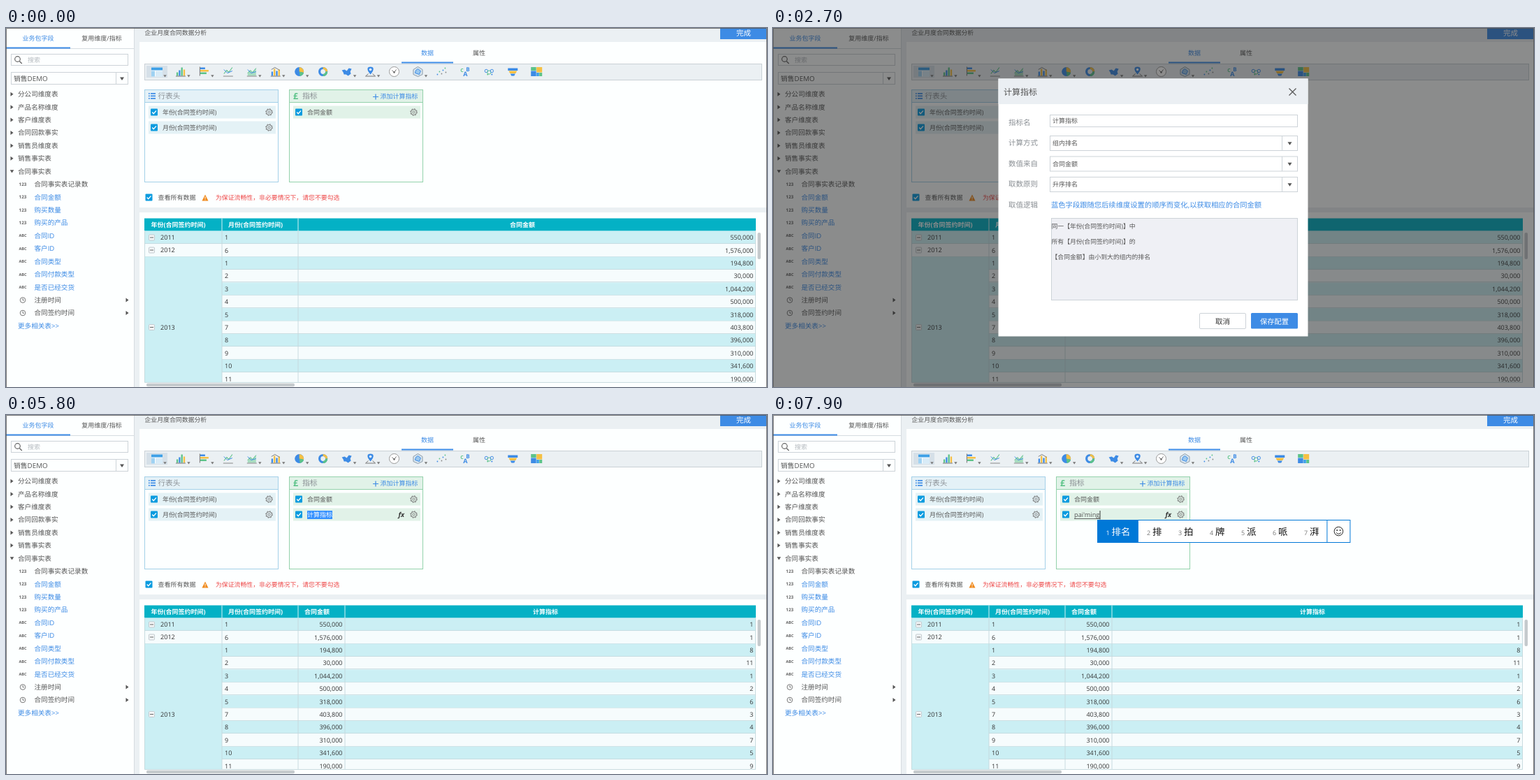
Recreate the animation shown at these times as an HTML page. Size 1089 px wide and 514 px high, loop 8 s.

```html
<!DOCTYPE html>
<html lang="zh-CN">
<head>
<meta charset="utf-8">
<style>
html, body { margin: 0; width: 100%; height: 100%; overflow: hidden; background: #ebf0f3; }
svg { display: block; width: 1089px; height: 514px; }
text { font-family: "Open Sans", "Noto Sans CJK SC", "Noto Sans CJK", sans-serif; white-space: pre; text-rendering: geometricPrecision; }
</style>
</head>
<body>
<svg id="stage" viewBox="0 0 1089 514"></svg>
<script>
const LOOP = 8000, BLUE = '#3d8be5', INK = '#555', DARK = '#333', GREY = '#8a8f94', LINE = '#cdd3d8';
const GREEN = '#5cc389', YELLOW = '#f5c044', IME = '#0078d7', WHITE = '#fdffff';

// Drawing helpers; text y is the vertical centre of the line.
const rect = (x, y, w, h, fill, stroke = 'none', extra = '') =>
  `<rect x="${x}" y="${y}" width="${w}" height="${h}" fill="${fill}" stroke="${stroke}" ${extra}/>`;
const path = (d, stroke, width = 1, fill = 'none') =>
  `<path d="${d}" stroke="${stroke}" stroke-width="${width}" fill="${fill}"/>`;
const shape = (d, fill) => path(d, 'none', 0, fill);
const dot = (x, y, r, fill, stroke = 'none', width = 1) =>
  `<circle cx="${x}" cy="${y}" r="${r}" fill="${fill}" stroke="${stroke}" stroke-width="${width}"/>`;
const text = (x, y, s, size = 9, fill = INK, extra = '') =>
  `<text x="${x}" y="${y + size * 0.36}" font-size="${size}" fill="${fill}" ${extra}>${s.replace(/</g, '&lt;').replace(/>/g, '&gt;')}</text>`;
const MID = 'text-anchor="middle"', END = 'text-anchor="end"', BOLD = 'font-weight="700"';
const at = (x, y, s) => `<g transform="translate(${x} ${y})">${s}</g>`;
const down = (x, y, r = 3, fill = INK) => shape(`M${x - r} ${y - r * 0.7}h${2 * r}l${-r} ${r * 1.5}z`, fill);
const right = (x, y) => shape(`M${x - 2} ${y - 3}v6l4 -3z`, INK);
const check = (x, y) => rect(x - 5, y - 5, 10, 10, '#0a9bdf', 'none', 'rx="1"') +
  path(`M${x - 2.8} ${y}l2 2.2l3.8 -4.4`, '#fff', 1.3);
const gear = (x, y) => dot(x, y, 4, 'none', '#777') + dot(x, y, 1.6, 'none', '#777', 0.9) +
  `<circle cx="${x}" cy="${y}" r="4.8" fill="none" stroke="#777" stroke-width="1" stroke-dasharray="1.8 1.97"/>`;
const bars = (hs, colors) => hs.map((h, i) => rect(-6 + i * 3.3, 6 - h, 2.3, h, colors[i % colors.length])).join('');

function sidebar() {
  let s = rect(0, 0, 183, 514, WHITE) + path('M183.5 0V514', '#d6dce0') +
    text(46, 14.5, '业务包字段', 9, BLUE, MID) + text(137, 14.5, '复用维度/指标', 9, INK, MID) +
    path('M0 29.5H183', '#d6dce0') + rect(0, 27.5, 92, 2, BLUE) +
    rect(7.5, 37.5, 167, 16, WHITE, LINE) + dot(16.5, 44.5, 3.8, 'none', '#666', 1.2) +
    path('M19.3 47.5l3.5 3.5', '#666', 1.3) + text(31, 45.5, '搜索', 9, '#b5babf') +
    rect(7.5, 63.5, 167, 17, WHITE, LINE) + path('M157.5 63V81', LINE) + text(11, 72, '销售DEMO', 9.8) + down(166, 72.5);
  const rowY = i => 94.7 + i * 18.43;
  ['分公司维度表', '产品名称维度', '客户维度表', '合同回款事实', '销售员维度表', '销售事实表', '合同事实表'].forEach((n, i) => {
    s += (i < 6 ? right(8.5, rowY(i)) : down(8.5, rowY(i), 2.8)) + text(17, rowY(i), n, 9.6);
  });
  ['合同事实表记录数', '合同金额', '购买数量', '购买的产品', '合同ID', '客户ID', '合同类型', '合同付款类型', '是否已经交货', '注册时间', '合同签约时间'].forEach((n, i) => {
    const y = rowY(i + 7), date = i > 8;
    s += date ? dot(24, y, 3.8, 'none', '#777') + path(`M24 ${y - 2.4}v2.6h2`, '#777') + right(173.5, y)
      : text(24, y, i < 4 ? '123' : 'ABC', i < 4 ? 6.3 : 5.6, '#666', MID + ' ' + BOLD);
    s += text(40.5, y, n, 9.6, i && !date ? BLUE : INK);
  });
  return s + text(17, rowY(18), '更多相关表>>', 9.6, BLUE);
}

function icons() {
  const list = [
    rect(-8, -6, 16, 13, '#fff') + rect(-8, -6, 16, 4, '#3ea0e6') + rect(-8, -1, 5, 8, '#9fd2f2') + rect(-2, -1, 10, 8, '#d8ebf7'),
    bars([5, 8, 12, 9], [GREEN, BLUE, GREEN, YELLOW]) + path('M-7 6.5H7', '#777'),
    rect(-6, -6, 7, 2.5, BLUE) + rect(-6, -2.5, 12, 2.5, YELLOW) + rect(-6, 1, 9, 2.5, GREEN) + path('M-6.5 -7V6', '#777'),
    path('M-6 3L-2 -2L1 1L6 -6', GREEN, 1.1) + path('M-6 -3L-1 2L6 -1', BLUE) + path('M-7 6.5H7', '#888'),
    shape('M-6 6V2L-2 -2L1 1L6 -5V6z', '#a8dcc0') + path('M-6 2L-2 -2L1 1L6 -5', GREEN) + path('M-6 -3L-1 2L6 0', BLUE) + path('M-7 6.5H7', '#888'),
    bars([6, 10, 7, 9], [BLUE, YELLOW]) + path('M-6 -3L-1 -6L6 -2', '#777', 0.9) + path('M-7 6.5H7', '#777'),
    dot(0, 0, 6.5, BLUE) + shape('M0 0V-6.5A6.5 6.5 0 0 1 6.3 1.5z', YELLOW) + shape('M0 0L6.3 1.5A6.5 6.5 0 0 1 1 6.4z', GREEN),
    dot(0, 0, 5, 'none', BLUE, 3.2) + path('M0 -5A5 5 0 0 1 5 0', YELLOW, 3.2) + path('M5 0A5 5 0 0 1 0 5', GREEN, 3.2),
    shape('M-7 -2L-3 -3L0 -1L3 -5L7 -4L5 0L6 3L2 6L-1 4L-4 4L-5 1z', BLUE),
    shape('M0 4C-7 -4 -4 -7 0 -7S7 -4 0 4z', BLUE) + dot(0, -3, 1.7, '#fff') + path('M-3 3L-7 6.5H7L3 3', '#777'),
    dot(0, 0, 7, '#fff', '#999') + path('M0 1L-3 -2M0 1L3 -3', '#666') + dot(0, 1, 1.2, '#666'),
    path('M0 -7L6.5 -3V4L0 7L-6.5 4V-3z', '#8a9aa8', 1, '#dce8f0') + path('M0 -4L4 -1L2 4L-4 2L-3 -2z', BLUE, 1, '#9cc8ee'),
    [[-6, 4], [-3, 0], [0, 3], [2, -2], [5, -5], [6, 1]].map(([x, y], i) => dot(x, y, 0.9, [BLUE, GREEN, '#888'][i % 3])).join(''),
    text(-7, -2, 'C', 7, GREEN, BOLD) + text(1, -3, 'B', 8, BLUE, BOLD) + text(-3, 3, 'A', 9, BLUE, BOLD),
    dot(-4, -1, 2.2, 'none', BLUE) + dot(0, 1, 2.6, 'none', GREEN) + dot(4, -1, 2.2, 'none', BLUE) + dot(-2, 4, 1, GREEN) + dot(4, 4, 1, BLUE),
    rect(-7, -5, 14, 3.5, BLUE) + shape('M-6 -1H6L4 2.5H-4z', YELLOW) + shape('M-3.5 3H3.5L2 6H-2z', BLUE),
    rect(-8, -6.5, 7.5, 5, GREEN) + rect(-8, -1, 7.5, 7.5, BLUE) + rect(0, -6.5, 8, 7.5, YELLOW) + rect(0, 1.5, 3.6, 5, '#3ea0e6') + rect(4, 1.5, 4, 5, GREEN)
  ];
  const menu = [0, 1, 2, 4, 5, 6, 8, 9, 11];
  return list.map((g, i) => at(216 + i * 33.95, 62.5, g + (menu.includes(i) ? down(11.5, 6.3, 2.2, '#777') : ''))).join('');
}

function chip(x, y, name, fill) {
  return rect(x, y - 9, 182, 18, fill) + check(x + 8, y) + (name ? text(x + 20, y, name) : '') + gear(x + 172.5, y);
}

function panels(t) {
  let s = rect(191, 20, 898, 237, WHITE) + text(198.5, 7, '企业月度合同数据分析', 8.9) +
    rect(1022, 0, 66, 16, BLUE) + text(1055.5, 7.5, '完成', 10.5, '#fff', MID) +
    text(603, 36, '数据', 9, BLUE, MID) + text(677, 36, '属性', 9, INK, MID) +
    rect(198.5, 51.5, 883, 23, '#ebf0f3', '#cad1d6') + rect(566, 48.5, 74, 2, BLUE) +
    rect(201, 54, 30, 17, '#d6e0e8') + icons();

  const box = (x, head, line) => rect(x + 0.5, 88.5, 191, 132, WHITE, line) + rect(x + 0.5, 88.5, 191, 18, head, line);
  s += box(198, '#e4f1f7', '#a3d0e8') + [0, 1, 2].map(i => rect(204, 93 + i * 3.5, 1.7, 1.7, BLUE) + rect(207, 93 + i * 3.5, 7, 1.7, BLUE)).join('') +
    text(217.5, 97.5, '行表头', 10.6, GREY) +
    chip(204, 120.5, '年份(合同签约时间)', '#e4f2f6') + chip(204, 142.5, '月份(合同签约时间)', '#e4f2f6');
  const link = t >= 900 && t < 4800 ? '#6ba8ee' : BLUE;
  s += box(405, '#e1f2e8', '#93d2ab') + text(411, 97, '£', 12.5, GREEN, BOLD) + text(424, 97.5, '指标', 10.8, GREY) +
    path('M525 98.5h8M529 94.5v8', BLUE, 1.2) + text(535.5, 98, '添加计算指标', 9, link) + chip(411, 120.5, '合同金额', '#e1f2e8');
  if (t >= 4800) {
    s += chip(411, 142.5, t < 5800 ? '计算指标' : '', '#e1f2e8') +
      text(561.5, 142.3, 'fx', 9.5, DARK, BOLD + ' font-style="italic"');
    if (t >= 5800 && t < 6900) s += rect(431, 137, 36, 12, '#3390ff') + text(431, 142.5, '计算指标', 9, '#fff');
  }
  return s + check(204.5, 242.5) + text(217.5, 243, '查看所有数据') +
    shape('M285 238.5L289.5 247.5H280.5z', '#f08a1d') + path('M285 241.5v3M285 245.4v1', '#fff') +
    text(300, 243, '为保证流畅性，非必要情况下，请您不要勾选', 8.9, '#ee4848');
}

function table(t) {
  const months = [1, 6, 1, 2, 3, 4, 5, 7, 8, 9, 10, 11];
  const sums = [550000, 1576000, 194800, 30000, 1044200, 500000, 318000, 403800, 396000, 310000, 341600, 190000];
  const ranks = [1, 1, 8, 11, 1, 2, 6, 3, 4, 7, 5, 9];
  const ranked = t >= 5100, tint = '#cbeff4', edge = '#c5d9dd';
  const year = (y, n) => rect(204.5, y - 4, 8, 8, '#f2f5f6', '#c4cbd0', 'rx="1"') +
    path(`M206 ${y}h5`, '#666') + text(221, y, n, 9.1, DARK);
  let s = rect(191, 264, 898, 250, WHITE) + rect(198, 272.5, 875, 18, '#04b1c5');
  let rows = '';
  months.forEach((m, i) => {
    const y = 300 + i * 18.4, top = y - 9.2;
    rows += rect(i < 2 ? 198 : 309, top, i < 2 ? 875 : 764, 18.4, i % 2 ? '#f6fcfd' : tint) +
      path(`M${i < 2 ? 198 : 309} ${Math.round(top + 18.4) - 0.5}H1073`, edge, 0.8) +
      text(313, y, String(m), 9, DARK) + text(ranked ? 481.5 : 1069.5, y, sums[i].toLocaleString('en-US'), 9, DARK, END) +
      (ranked ? text(1069.5, y, String(ranks[i]), 9, DARK, END) : '');
  });
  s += `<svg x="0" y="290" width="1073" height="217.5" viewBox="0 290 1073 217.5">${rows}${rect(198, 327.5, 111, 181, tint)}</svg>` +
    year(300, '2011') + year(318, '2012') + year(428.5, '2013') +
    path('M198.5 290V507.5H1072.5V290M309 290V507M418 290V507' + (ranked ? 'M485 290V507' : ''), edge, 0.9) +
    path('M309 272.5V290.5M418 272.5V290.5' + (ranked ? 'M485 272.5V290.5' : ''), '#d8f3f6');
  const head = (x, n, a = '') => text(x, 281.5, n, 9, '#fff', BOLD + ' ' + a);
  s += head(207.5, '年份(合同签约时间)') + head(318, '月份(合同签约时间)') +
    (ranked ? head(445, '合同金额', MID) + head(772, '计算指标', MID) : head(739, '合同金额', MID));
  return s + rect(201, 508.7, 212, 4.5, '#c5cacd', 'none', 'rx="2"') + rect(1075.5, 293, 4.5, 38, '#c5cacd', 'none', 'rx="2"');
}

function combo(y, value) {
  return rect(396.5, y - 10.5, 354, 21, '#fff', LINE) + path(`M728.5 ${y - 10.5}v21`, LINE) +
    text(400, y, value) + down(739.5, y + 0.3);
}

function dropdown(y, names, hot) {
  return rect(396.5, y + 0.5, 354, names.length * 22 + 1, '#fff', LINE) + names.map((n, i) => {
    const c = y + 12 + i * 22;
    return text(404, c - 0.5, n, 9, i === hot ? BLUE : INK);
  }).join('');
}

function dialog(t) {
  const label = (y, n) => text(337, y, n, 10.5, GREY);
  let s = rect(0, 0, 1089, 514, 'rgba(26,26,26,.5)') + rect(322.5, 72.5, 443, 369, '#fff') +
    rect(322.5, 72.5, 443, 36.5, '#ebeff3') + text(330, 91.5, '计算指标', 12, INK) +
    path('M738.5 86.5l10 10M748.5 86.5l-10 10', '#555', 1.2) +
    label(135, '指标名') + rect(396.5, 124.5, 354, 17, '#fff', LINE) + text(400, 133, '计算指标') +
    label(164.5, '计算方式') + combo(165, t < 2600 ? '公式' : '组内排名') +
    rect(610.5, 408.5, 66, 22, '#fff', LINE, 'rx="1.5"') + text(643.5, 420, '取消', 10.5, DARK, MID) +
    rect(684, 408, 67, 22.5, BLUE, 'none', 'rx="1.5"') + text(717.5, 420, '保存配置', 10.3, '#fff', MID);
  if (t < 2600) {
    s += rect(337.5, 183.5, 413, 206, '#fff', LINE) + rect(338, 184, 118, 205, '#edf0f4') +
      path('M456.5 183V389M456.5 366.5H750', LINE) + down(347.5, 194, 2.6) +
      text(356, 193.5, '数值字段(1)') + text(367.5, 211.5, '合同金额') +
      text(459, 198.5, '示例：销售额/计划销售额', 10.4, '#c3c7cb') +
      [...'+-*/()'].map((c, i) => text(466.5 + i * 21.4, 378.5, c, 9, INK, MID)).join('') +
      text(698, 379, '更多函数>', 9, BLUE);
    if (t >= 2000) s += dropdown(176.5, ['公式', '排名', '组内排名', '累计值', '组内累计值', '所有值', '组内所有值', '同期值', '环期值', '同期增长率'],
      t < 2200 ? 0 : t < 2400 ? 1 : 2);
    return s;
  }
  const desc = t >= 3900;
  s += label(194, '数值来自') + combo(194.5, '合同金额') + label(223.5, '取数原则') + combo(224, desc ? '降序排名' : '升序排名') +
    label(253, '取值逻辑') + text(398, 253, '蓝色字段跟随您后续维度设置的顺序而变化,以获取相应的合同金额', 10.3, BLUE) +
    rect(398.5, 272.5, 352, 117, '#eff0f5', LINE) +
    ['同一【年份(合同签约时间)】中', '所有【月份(合同签约时间)】的', `【合同金额】由${desc ? '大到小' : '小到大'}的组内的排名`]
      .map((n, i) => text(398.5, 283.5 + i * 22, n, 8.85)).join('');
  if (t >= 3400 && !desc) s += dropdown(236, ['升序排名', '降序排名'], t < 3700 ? 0 : 1);
  return s;
}

function spinner(t) {
  let s = '';
  const turn = Math.floor((t - 4800) / 100) * 30;
  for (let i = 0; i < 12; i++)
    s += `<path d="M8 0H16.5" stroke="#4a8fd6" stroke-width="2" stroke-linecap="round" opacity="${1 - i / 12.5}" transform="rotate(${90 - i * 30 + turn})"/>`;
  return at(640, 390, s);
}

// Start time, typed letters, caret x, candidates
const typing = [
  [6900, 'p', 437, '怕 拍 跑 盘 片 票 平'],
  [7100, 'pa', 442, '怕 爬 趴 啪 帕 扒 琶'],
  [7300, "pai", 444.5, '排 拍 牌 派 哌 湃 徘'],
  [7500, "pai'm", 453, '拍卖 排名 排满 拍马 牌面 派买 排忙'],
  [7600, "pai'mi", 456, '排 拍 牌 派 哌 湃 徘'],
  [7700, "pai'min", 462.5, '排名 排 拍 牌 派 哌 湃'],
  [7900, "pai'ming", 468, '排名 排 拍 牌 派 哌 湃']
];

function input(t) {
  const [, word, caret, list] = typing.filter(k => t >= k[0]).pop();
  const left = caret - 3.5;
  let s = text(431, 142.5, word, 9.2) + path(`M431 148.5H${caret}`, '#555', 0.9) + path(`M${caret} 137V149.5`, '#222', 0.9);
  let x = left, popup = '';
  list.split(' ').forEach((word, i) => {
    const w = 31.6 + 13.4 * word.length;
    if (!i) popup += rect(x, 150.5, w, 32, IME);
    popup += text(x + 12, 168.8, String(i + 1), 9, i ? '#777' : '#fff') + text(x + 20, 167.5, word, 13.4, i ? '#111' : '#fff');
    x += w;
  });
  popup = rect(left, 150.5, x - left + 33, 32, '#fff', IME) + popup + path(`M${x} 150.5v32`, IME) +
    dot(x + 16.5, 166.5, 6.3, 'none', '#222') + dot(x + 14.3, 165, 0.9, '#222') + dot(x + 18.7, 165, 0.9, '#222') +
    path(`M${x + 13} 168.3q3.5 4 7 0`, '#222');
  return s + `<g opacity="${t < 7000 ? 0.75 : 1}">${popup}</g>`;
}

const stage = document.getElementById('stage');
let shown = -1;

function draw(now) {
  const t = Math.floor(now % LOOP / 100) * 100;
  if (t !== shown) {
    shown = t;
    let s = rect(0, 0, 1089, 514, '#ebf0f3') + sidebar() + panels(t) + table(t);
    if (t >= 1200 && t < 4800) s += dialog(t);
    if (t >= 4800 && t < 5100) s += spinner(t);
    if (t >= 6900) s += input(t);
    stage.innerHTML = s + path('M0.5 514V0.5H1088.5V514', '#555', 0.8);
  }
}

const start = performance.now();
function tick() {
  draw(performance.now() - start);
  requestAnimationFrame(tick);
}
tick();
</script>
</body>
</html>
```
